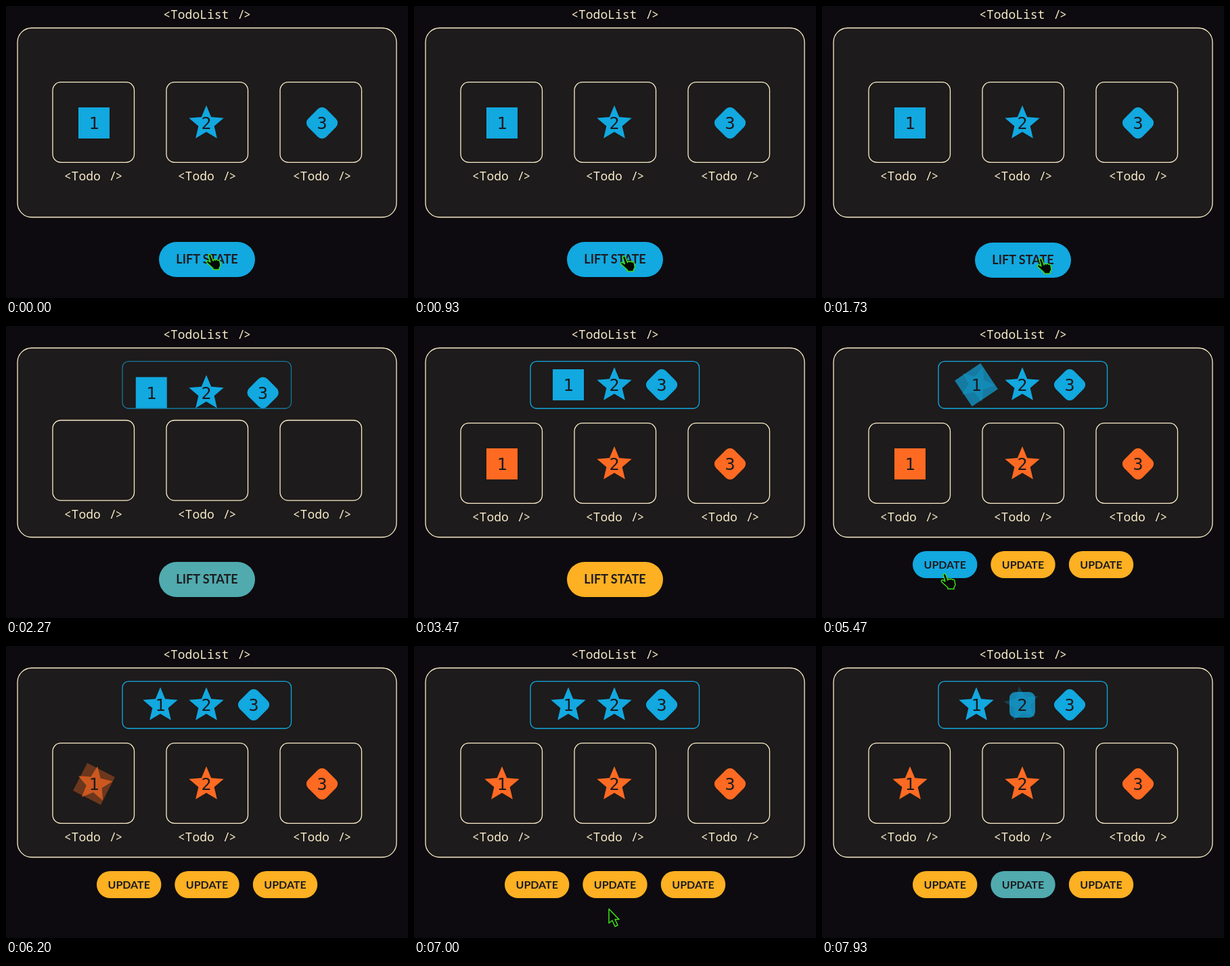
An HTML page that plays this animation: 594 by 432 pixels, repeating every 8000 ms.

```html
<!DOCTYPE html>
<html lang="en">
<head>
<meta charset="utf-8">
<title>Lifting state</title>
<style>
html, body { margin: 0; width: 100%; height: 100%; overflow: hidden; background: #0d0b0f; }
svg { display: block; width: 594px; height: 432px; }
text { text-anchor: middle; }
.label { font: 18px "Noto Sans Mono", monospace; fill: #f6e9c8; white-space: pre; }
.digit { font: 25px "DejaVu Sans Mono", monospace; fill: #1d1b1e; }
.button { font: 700 18px Lato, sans-serif; fill: #1d1b1e; }
.small { font-size: 16px; }
.frame { fill: #1d1b1b; stroke: #fbeecb; stroke-width: 1.3; }
#stateBox { fill: none; stroke: #12a8e0; stroke-width: 1.3; }
#cursor path { fill: #050805; stroke: #3fe01c; stroke-width: 1.5; stroke-linejoin: round; }
</style>
</head>
<body>
<svg id="stage" viewBox="0 0 594 432"></svg>
<script>
const LOOP = 8000;
const BLUE = [18, 168, 224], AMBER = [252, 176, 34], ORANGE = "#ff6a22";
const stage = document.getElementById("stage");

function add(parent, tag, attrs = {}, text = "") {
  const node = document.createElementNS("http://www.w3.org/2000/svg", tag);
  for (const key in attrs) node.setAttribute(key, attrs[key]);
  node.textContent = text;
  parent.append(node);
  return node;
}
const set = (node, key, value) => node.setAttribute(key, value);
const move = (node, x, y) => set(node, "transform", `translate(${x} ${y})`);
const mix = (a, b, p) => a + (b - a) * p;
const ramp = (t, start, length) => Math.min(1, Math.max(0, (t - start) / length));
const smooth = p => p * p * (3 - 2 * p);
const easeOut = p => 1 - (1 - p) ** 3;
const blend = p => `rgb(${BLUE.map((c, i) => Math.round(mix(c, AMBER[i], p)))})`;

const box = (parent, x, y, width, height, rx, attrs) =>
  add(parent, "rect", { x, y, width, height, rx, ...attrs });

function label(parent, name, x, y) {
  const text = add(parent, "text", { class: "label", x, y }, `<${name} `);
  add(text, "tspan", { dx: 2 }, "/");
  add(text, "tspan", { dx: -2 }, ">");
}

function starPoints() {
  return Array.from({ length: 10 }, (_, i) => {
    const angle = i * Math.PI / 5, r = i % 2 ? 12.2 : 27;
    return `${(r * Math.sin(angle)).toFixed(2)},${(1 - r * Math.cos(angle)).toFixed(2)}`;
  }).join(" ");
}

function drawShape(parent, kind, fill) {
  const g = add(parent, "g", { fill });
  if (kind === "square") box(g, -23, -23, 46, 46, 0);
  if (kind === "star") add(g, "polygon", { points: starPoints() });
  if (kind === "diamond") box(g, -19, -19, 38, 38, 9, { transform: "rotate(45)" });
  return g;
}

function makeItem(number, kind, nextKind, fill) {
  const root = add(stage, "g");
  const before = drawShape(root, kind, fill);
  const after = nextKind && drawShape(root, nextKind, fill);
  add(root, "text", { class: "digit", y: 9 }, number);
  return { root, before, after };
}

// Old shape spins out while the new one spins in.
function swap(item, p) {
  if (!item.after) return;
  set(item.before, "transform", `rotate(${180 * p})`);
  set(item.before, "opacity", 1 - p);
  set(item.after, "transform", `rotate(${180 * (p - 1)})`);
  set(item.after, "opacity", p);
}

function makeButton(parent, x, y, w, h, text, baseline, cls) {
  const g = add(parent, "g");
  const back = box(g, x, y, w, h, h / 2);
  add(g, "text", { class: cls, x: x + w / 2, y: baseline }, text);
  return { g, back };
}

label(stage, "TodoList", 297, 19);
box(stage, 17, 32.5, 560, 280, 21, { class: "frame" });
const todos = add(stage, "g");
[[69, 129], [237, 297], [405, 467]].forEach(([x, labelX]) => {
  box(todos, x, 112.7, 120.5, 118.6, 12, { class: "frame" });
  label(todos, "Todo", labelX, 258);
});
const stateBox = box(stage, 172, 52.3, 249.5, 69.7, 9, { id: "stateBox" });

const items = [
  { kind: "square", next: "star", home: 130, lifted: 228 },
  { kind: "star", next: "diamond", home: 296, lifted: 296 },
  { kind: "diamond", next: null, home: 467, lifted: 366 }
];
items.forEach((item, i) => item.state = makeItem(i + 1, item.kind, item.next, blend(0)));
items.forEach((item, i) => item.prop = makeItem(i + 1, item.kind, item.next, ORANGE));

const lift = makeButton(stage, 226, 349, 142, 52, "LIFT STATE", 381, "button");
const updateRow = add(stage, "g");
const updates = [134, 249.3, 364.8].map(x =>
  makeButton(updateRow, x, 333, 95.4, 40, "UPDATE", 359, "button small"));

const cursor = add(stage, "g", { id: "cursor" });
const hand = add(cursor, "path", {
  d: "M-2 1Q0-2 2 1L5 9Q6 6 8.5 8Q10 6 12 8.5Q14 7 15 10L16 16L14 20V22H5V20L-4 12Q-6 8-2 9L1 11Z"
});
const arrow = add(cursor, "path", { d: "M0 0V21L5 17L9 26L13 24L9 15.5H15Z" });

const cursorSteps = [
  [0, 301, 368], [300, 301, 368], [1700, 323, 374], [1980, 323, 374], [2250, 332, 445],
  [4500, 215, 445], [5080, 181, 367], [5620, 181, 367], [6000, 196, 445],
  [6350, 270, 445], [6920, 288, 389], [7000, 288, 389], [7180, 286, 397],
  [7460, 297, 366], [7820, 297, 366], [7920, 300, 445], [8000, 300, 445]
];

function cursorAt(t) {
  const i = cursorSteps.findIndex(step => step[0] > t);
  const [t0, x0, y0] = cursorSteps[i - 1], [t1, x1, y1] = cursorSteps[i];
  const p = smooth(ramp(t, t0, t1 - t0));
  return [mix(x0, x1, p), mix(y0, y1, p)];
}

const hoverAmount = (t, enter, leave) =>
  smooth(ramp(t, enter, 250)) - smooth(ramp(t, leave, 300));

function render(t) {
  const raise = easeOut(ramp(t, 1930, 700));
  move(todos, 0, 31 * raise);
  set(stateBox, "opacity", ramp(t, 1930, 520));

  const fall = smooth(ramp(t, 2720, 640));
  const swaps = [[5285, 5900], [7595, LOOP], [LOOP, LOOP]];
  items.forEach((item, i) => {
    move(item.state.root, mix(item.home, item.lifted, raise), mix(173, 87, raise));
    swap(item.state, smooth(ramp(t, swaps[i][0], 500)));
    move(item.prop.root, mix(item.lifted, item.home, fall), mix(87, 204, fall));
    set(item.prop.root, "opacity", ramp(t, 2720, 200));
    swap(item.prop, smooth(ramp(t, swaps[i][1], 500)));
  });

  const change = smooth(ramp(t, 3850, 300));
  set(lift.g, "opacity", 1 - change);
  move(lift.g, 0, t > 1690 && t < 1880 ? 1 : 4 * change);
  set(lift.back, "fill", blend(smooth(ramp(t, 2170, 300))));
  set(updateRow, "opacity", change);
  const hovers = [hoverAmount(t, 5010, 5700), hoverAmount(t, 7330, 7830), 0];
  updates.forEach((button, i) => set(button.back, "fill", blend(1 - hovers[i])));

  const [x, y] = cursorAt(t);
  const over = y < (t < 4000 ? 401 : 373);
  move(cursor, x, y);
  set(hand, "visibility", over ? "visible" : "hidden");
  set(arrow, "visibility", over ? "hidden" : "visible");
}

const start = performance.now();
function tick() {
  render((performance.now() - start) % LOOP);
  requestAnimationFrame(tick);
}
tick();
</script>
</body>
</html>
```
